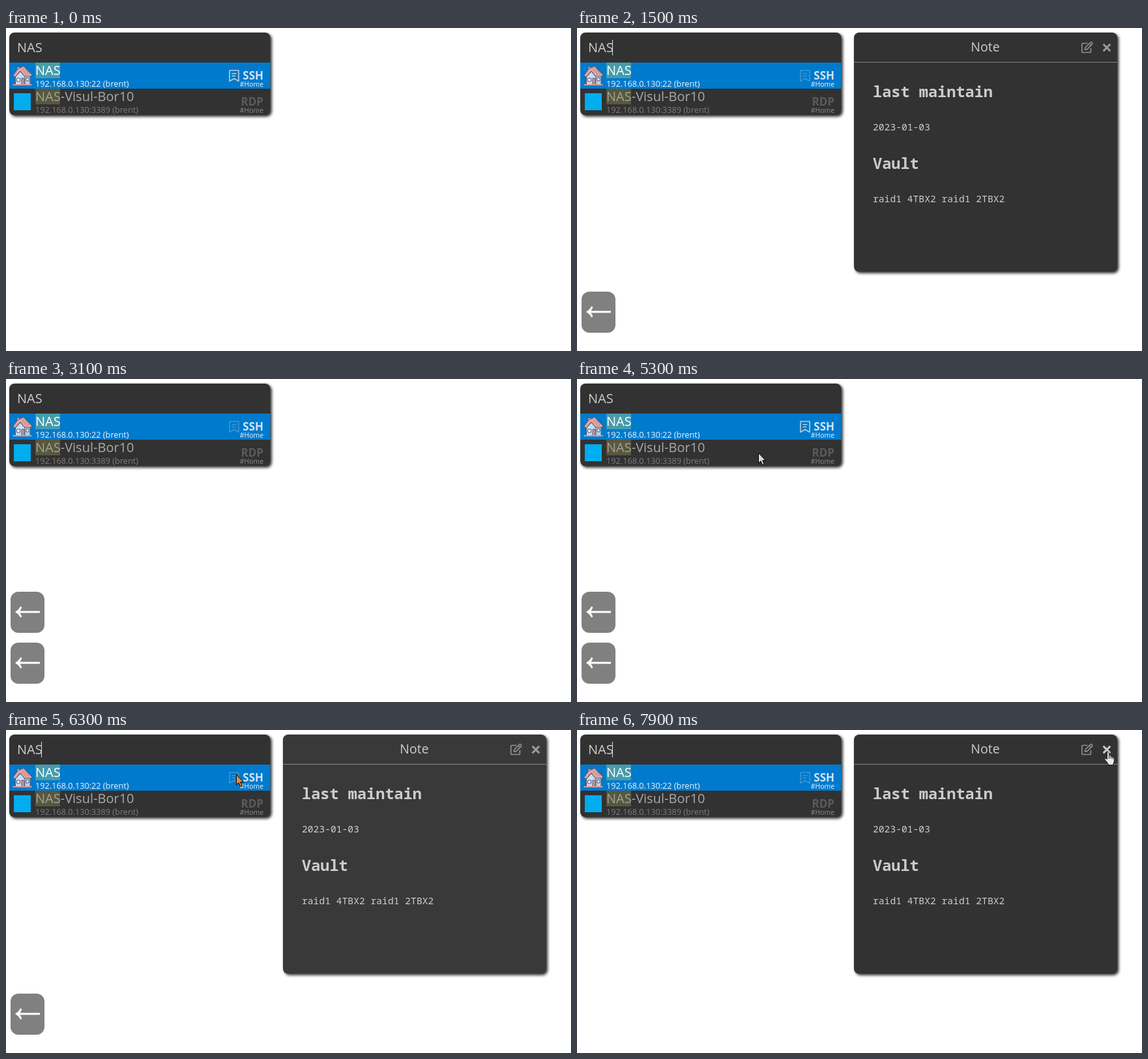
Write an HTML page that moves like this. It is 867 px wide and 495 px high and loops after 8000 ms.

```html
<!DOCTYPE html>
<html lang="en">
<head>
<meta charset="utf-8">
<title>Launcher note</title>
<style>
  html, body { margin: 0; width: 100%; height: 100%; overflow: hidden; background: #fff; }
  svg { display: block; width: 867px; height: 495px; }
  text { font-family: "Open Sans", "Noto Sans", sans-serif; font-size: 20px; white-space: pre; }
  .sub { font-size: 12.7px; }
  .tag { font-size: 10.4px; text-anchor: end; }
  .proto { font-size: 17px; font-weight: 700; text-anchor: end; }
  .mono { font-family: "Noto Sans Mono", "DejaVu Sans Mono", monospace; font-size: 14.67px; fill: #ccc; }
  .head { font-size: 23.6px; font-weight: 700; }
</style>
</head>
<body>
<svg viewBox="0 0 867 495" xmlns="http://www.w3.org/2000/svg">
  <defs>
    <filter id="shadow" x="-10%" y="-10%" width="120%" height="125%">
      <feDropShadow dx="2.2" dy="2.2" stdDeviation="2" flood-color="#000" flood-opacity=".85"/>
    </filter>
    <g id="key">
      <rect x="7" width="52" height="63" rx="12" fill="#808080"/>
      <path d="M15.5 31H52" stroke="#fff" stroke-width="3" fill="none"/>
      <path d="M14 31Q19.5 28 22 22.5L24.5 23.7Q23 28 20 31Q23 34 24.5 38.3L22 39.5Q19.5 34 14 31Z" fill="#fff"/>
    </g>
  </defs>
  <rect width="867" height="495" fill="#fff"/>

  <g id="launcher">
    <rect x="5" y="7" width="400.5" height="126.5" rx="8" fill="#323232" filter="url(#shadow)"/>
    <text x="17" y="37" fill="#ccc">NAS</text>
    <rect id="caret" x="54" y="18" width="1" height="24" fill="#ddd"/>

    <rect x="5" y="53" width="400.5" height="40" fill="#007acd"/>
    <rect x="45" y="53" width="38" height="24" fill="#469cad"/>
    <text x="45" y="72" fill="#fff">NAS</text>
    <text class="sub" x="45" y="90" fill="#eef5fb">192.168.0.130:22 (brent)</text>
    <text class="proto" x="395" y="79" fill="#cfe3f3">SSH</text>
    <text class="tag" x="395" y="90" fill="#eef5fb">#Home</text>
    <g id="mark" fill="none" stroke="#c0ccd5" stroke-width="1.6" stroke-linejoin="round">
      <path d="M343 65H357V81.5L350 77.5L343 81.5Z"/>
      <path d="M346.5 69.8H353.5M346.5 73.5H352"/>
    </g>

    <g stroke="#4c5673" stroke-width="1" stroke-linejoin="round">
      <path d="M14 72H37V86.5H14Z" fill="#b4d3ee"/>
      <path d="M17 65V59.5H21V64" fill="#d8c3c8"/>
      <path d="M10.5 73L18 62.5L27 58.5L39.5 71.5V74H28L22 66L14 75Z" fill="#e3a39f"/>
      <path d="M14.5 75L22 66.5L29 75V86.5H14.5Z" fill="#c6def3"/>
      <path d="M16.5 77H21.5V82H16.5ZM31 76.5H35V81H31Z" fill="#eef6ff"/>
      <path d="M24 77H28V86.5H24Z" fill="#db928f"/>
      <path d="M10.5 87H39.5" stroke="#d39a98" stroke-width="2"/>
      <path d="M25 62L31 71M30 63L35 71" stroke="#c57f80" fill="none"/>
    </g>

    <rect x="12" y="100" width="26" height="26" fill="#00adef"/>
    <rect x="45" y="93" width="38" height="24" fill="#58573f"/>
    <text x="45" y="112" fill="#aaa"><tspan fill="#a3a394">NAS</tspan>-Visul-Bor10</text>
    <text class="sub" x="45" y="130" fill="#7d7d7d">192.168.0.130:3389 (brent)</text>
    <text class="proto" x="395" y="119" fill="#5b5b5b">RDP</text>
    <text class="tag" x="395" y="130" fill="#8c8c8c">#Home</text>
  </g>

  <g id="note">
    <rect x="425" y="7" width="404" height="366.5" rx="8" fill="#323232" filter="url(#shadow)"/>
    <path d="M425 52.5H829" stroke="#858585"/>
    <text x="626.5" y="36" font-size="19.5" style="font-size:19.5px" text-anchor="middle" fill="#ccc">Note</text>
    <g fill="none" stroke="#8e8e8e" stroke-width="1.7" stroke-linejoin="round">
      <path d="M783.5 23.5H776.5Q774.8 23.5 774.8 25.2V35.8Q774.8 37.5 776.5 37.5H786.8Q788.5 37.5 788.5 35.8V31"/>
      <path d="M780 30L788 22Q789 21.3 790.2 22.5Q791.4 23.7 790.6 24.8L782.8 32.6L779.4 33.2ZM786.2 24L788.8 26.6"/>
    </g>
    <path id="close" d="M807.7 24.8L818.3 35.4M818.3 24.8L807.7 35.4" stroke="#999" stroke-width="3"/>
    <text class="mono head" x="454" y="106">last maintain</text>
    <text class="mono" x="454" y="157">2023-01-03</text>
    <text class="mono head" x="454" y="216">Vault</text>
    <text class="mono" x="454" y="267">raid1 4TBX2 raid1 2TBX2</text>
  </g>

  <use id="keyTop" href="#key" y="326"/>
  <use id="keyLow" href="#key" y="404"/>

  <path id="arrow" d="M.5 .5V16L4 12.7L6.6 18.6L9.2 17.5L6.7 11.8H11.3Z" stroke="#000" stroke-width="1"/>
  <g id="hand" stroke="#222" stroke-width="1" stroke-linejoin="round">
    <path d="M-1.5 1.5Q0-.8 1.5 1.5V8Q3-.0 4.3 8Q5.8 6.6 7 9Q8.7 8 9.3 10.5V15Q9 17 8 18V20.5H0V18.5L-5.3 12Q-5 9.4-2.8 10.8L-1.5 12Z" fill="#e8e8e8"/>
    <path d="M1.5 8V11M4.3 8V11M7 9V11.5" fill="none"/>
  </g>
</svg>
<script>
const LOOP = 8000, STEP = 100;
const $ = id => document.getElementById(id);
const clamp = v => Math.max(0, Math.min(1, v));
const within = (t, a, b) => t >= a && t < b;
const show = (id, on) => $(id).setAttribute("opacity", +on);

const caretOn = [[600, 1100], [1500, 2100], [2500, 3000], [3400, 4000], [4500, 4900],
  [5400, 5900], [6300, 6900], [7400, 7800], [7900, 8000]];

// time, x, y of the pointer
const path = [[5300, 278, 113], [5700, 312, 83], [6100, 353, 68], [6800, 353, 68],
  [7400, 854, 44], [7700, 815, 33]];

function pointer(t) {
  let i = 0;
  while (i < path.length - 2 && t >= path[i + 1][0]) i++;
  const [t0, x0, y0] = path[i], [t1, x1, y1] = path[i + 1];
  const p = clamp((t - t0) / (t1 - t0)), e = p * p * (3 - 2 * p);
  return [x0 + (x1 - x0) * e, y0 + (y1 - y0) * e];
}

function noteOpacity(t) {
  if (t < 3100) return clamp((t - 962) / 200);
  if (t < 6900) return t < 6200 ? 0 : Math.min(.965, (t - 6107) / 200);
  return 1;
}

function draw(now) {
  const t = Math.floor(now % LOOP / STEP) * STEP;
  const [x, y] = pointer(t);
  const place = `translate(${x.toFixed(1)} ${y.toFixed(1)})`;
  const overClose = t >= 7600;
  show("caret", caretOn.some(([a, b]) => within(t, a, b)));
  show("note", noteOpacity(t));
  show("mark", within(t, 1000, 3200) || t >= 6200 ? .32 : 1);
  show("keyTop", t < 3100 ? 0 : clamp((5700 - t) / 300));
  show("keyLow", t < 900 ? 0 : clamp((7900 - t) / 300));
  show("arrow", t >= 5300 && !overClose);
  show("hand", overClose);
  $("arrow").setAttribute("transform", place);
  $("arrow").setAttribute("fill", within(t, 6200, 6900) ? "#f08a3c" : "#dcdcdc");
  $("hand").setAttribute("transform", place);
  $("close").setAttribute("stroke", overClose ? "#ccc" : "#999");
}

const start = performance.now();
function tick() {
  draw(performance.now() - start);
  requestAnimationFrame(tick);
}
tick();
</script>
</body>
</html>
```
